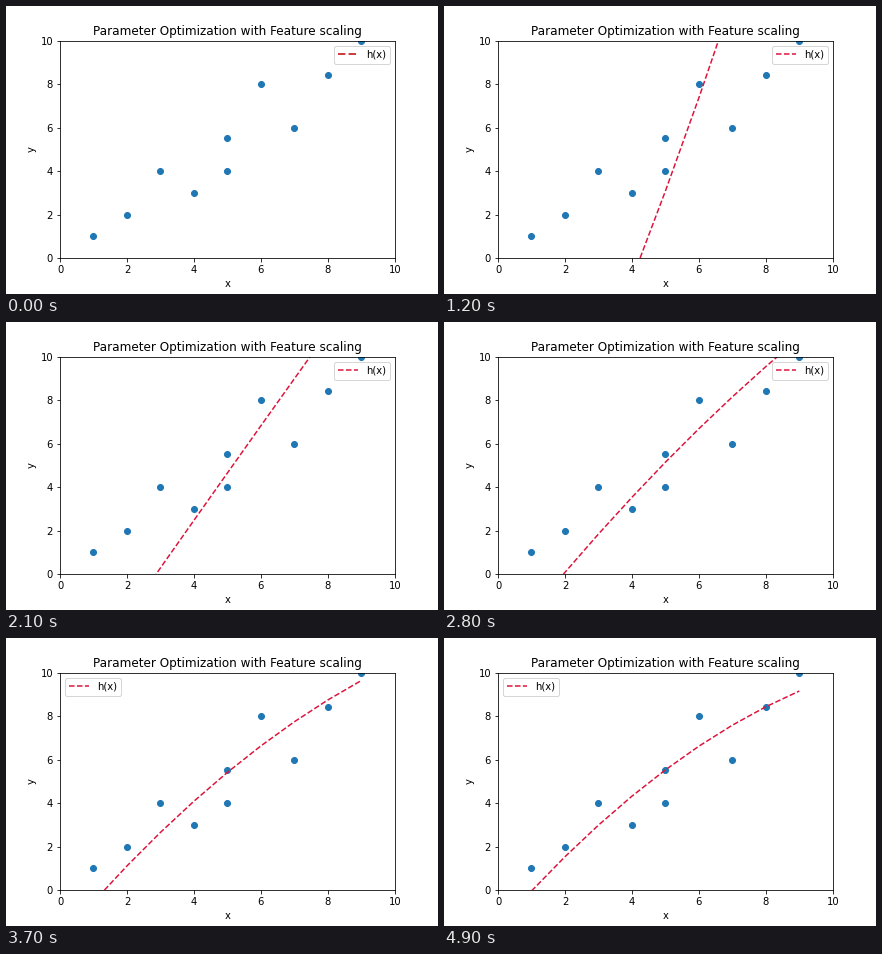
Animation of 432x288 px, one loop 5000 ms. Source, as a matplotlib script:

```python
import matplotlib.pyplot as plt
import numpy as np
from matplotlib.animation import FuncAnimation

FRAMES, INTERVAL = 50, 100
LEGEND_SWITCH = 29

plt.rcParams["font.family"] = "DejaVu Sans"

x = np.array([1, 2, 3, 4, 5, 5, 6, 7, 8, 9])
y = np.array([1, 2, 4, 3, 4, 5.5, 8, 6, 8.4, 10])
offset = x - x.mean()

fig, ax = plt.subplots(figsize=(6, 4), dpi=72)
fig.subplots_adjust(left=0.125, right=0.9, bottom=0.125, top=0.88)
ax.scatter(x, y)
line, = ax.plot([], [], "--", color="crimson", lw=1.5, label="h(x)")
ax.set(xlim=(0, 10), ylim=(0, 10), xlabel="x", ylabel="y",
       title="Parameter Optimization with Feature scaling")


def hypothesis(step):
    """Quadratic fit after the given number of descent steps."""
    decay = 0.889 ** step
    mean = y.mean() * (1 - 0.9 ** step)
    slope = 1.11 + 12.6 * decay
    curve = -0.063 + 0.7 * decay
    return mean + slope * offset + curve * (offset ** 2 - np.mean(offset ** 2))


def update(step):
    if step:
        line.set_data(x, hypothesis(step))
    else:
        line.set_data([], [])
    side = "right" if step < LEGEND_SWITCH else "left"
    legend = ax.legend(loc=f"upper {side}")
    if step == 0:
        legend.get_lines()[0].set(color="#cc4040", linewidth=2)
    return line, legend


anim = FuncAnimation(fig, update, frames=FRAMES, interval=INTERVAL,
                     init_func=lambda: update(0), repeat=True, repeat_delay=0)
plt.show()
```
